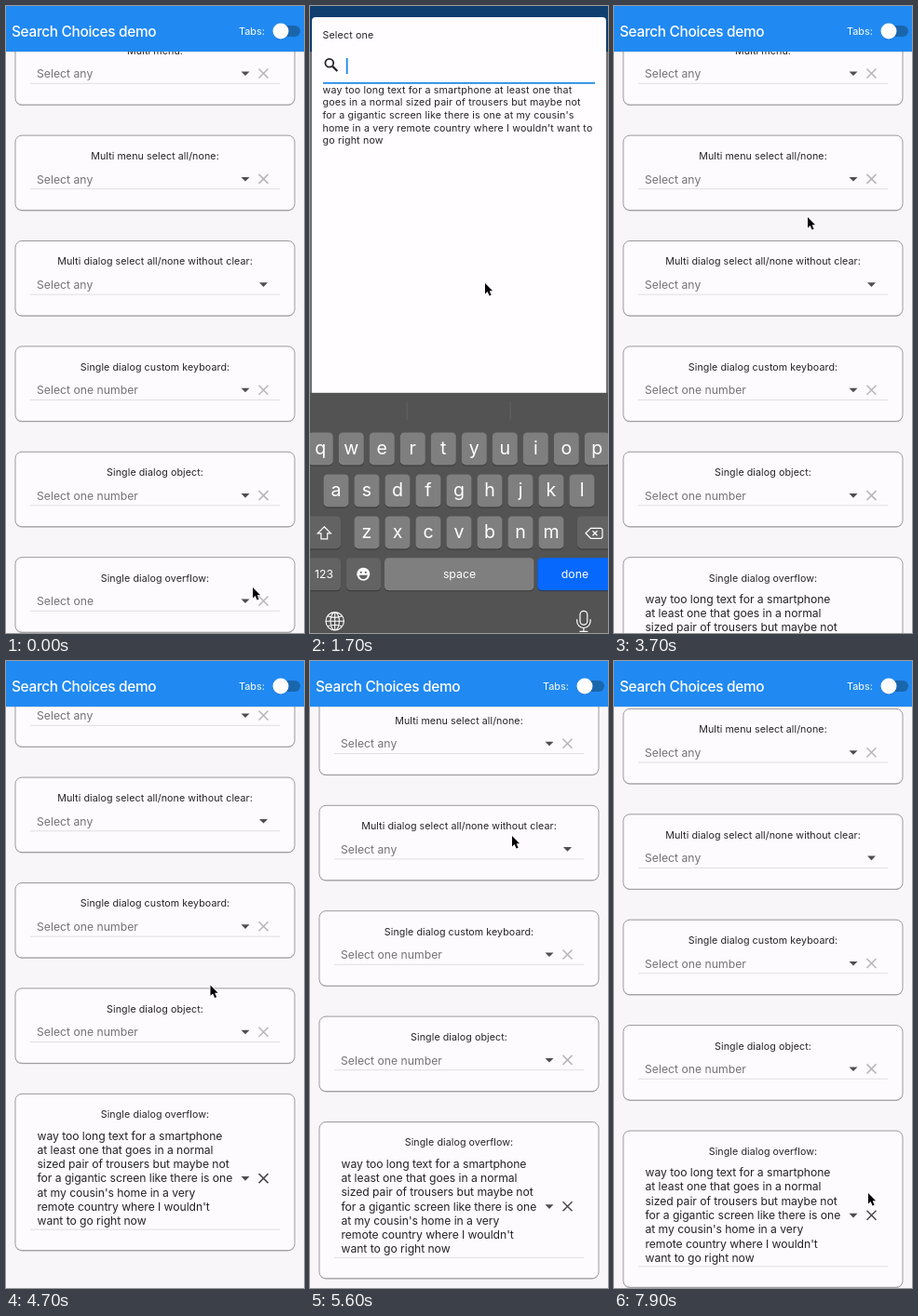
Write an HTML page with a canvas that moves like this. It is 320 by 674 pixels and loops after 8000 ms.

```html
<!DOCTYPE html>
<html lang="en">
<head>
<meta charset="utf-8">
<title>Search Choices demo</title>
<style>
  html, body { margin: 0; width: 100%; height: 100%; overflow: hidden; background: #f8f6f9; }
  canvas { display: block; width: 320px; height: 674px; }
</style>
</head>
<body>
<canvas id="stage"></canvas>
<script>
const W = 320, H = 674, LOOP = 8000;
const canvas = document.getElementById('stage');
const ctx = canvas.getContext('2d');
const ratio = window.devicePixelRatio || 1;
canvas.width = W * ratio;
canvas.height = H * ratio;

const BLUE = '#2089f2', BODY = '#f8f6f9', INK = '#242326', HINT = '#747276';
const MAX_SCROLL = 87.7;
const LONG_LINES = ['way too long text for a smartphone', 'at least one that goes in a normal',
  'sized pair of trousers but maybe not', 'for a gigantic screen like there is one',
  "at my cousin's home in a very", "remote country where I wouldn't", 'want to go right now'];
const DIALOG_LINES = ['way too long text for a smartphone at least one that',
  'goes in a normal sized pair of trousers but maybe not',
  "for a gigantic screen like there is one at my cousin's",
  "home in a very remote country where I wouldn't want to", 'go right now'];
const CARDS = [
  { title: 'Multi menu:', hint: 'Select any', clear: true },
  { title: 'Multi menu select all/none:', hint: 'Select any', clear: true },
  { title: 'Multi dialog select all/none without clear:', hint: 'Select any' },
  { title: 'Single dialog custom keyboard:', hint: 'Select one number', clear: true },
  { title: 'Single dialog object:', hint: 'Select one number', clear: true },
  { title: 'Single dialog overflow:', hint: 'Select one', clear: true, overflow: true }
];
// Pointer stops: time, x, y
const POINTER = [[0, 265, 625], [100, 265, 625], [400, 244, 636], [1000, 244, 636],
  [1650, 188, 298], [1900, 188, 298], [2500, 162, 127], [3150, 162, 127], [3600, 203, 212],
  [3700, 208, 227], [4150, 222, 510], [4250, 222, 510], [5150, 217, 188], [6050, 217, 188],
  [6300, 229, 213], [6700, 234, 244], [6950, 234, 244], [7780, 271, 562], [7900, 273, 572], [8000, 273, 572]];

const clamp = v => Math.max(0, Math.min(1, v));
const span = (t, a, b) => clamp((t - a) / (b - a));
const mix = (a, b, p) => a + (b - a) * p;
const smooth = p => p * p * (3 - 2 * p);
const easeOut = p => 1 - (1 - p) ** 3;
const gray = v => `rgb(${v},${v},${v})`;

function pointerAt(t) {
  const i = Math.max(1, POINTER.findIndex(k => k[0] >= t));
  const a = POINTER[i - 1], b = POINTER[i];
  const p = smooth(span(t, a[0], b[0]));
  return [mix(a[1], b[1], p), mix(a[2], b[2], p)];
}

function scrollAt(t) {
  if (t < 4250) return 0;
  const drag = 510 - pointerAt(Math.min(t, 5150))[1];
  const extra = Math.max(0, drag - MAX_SCROLL);
  let over = 0.593 * extra / (1 + extra * 0.0014);
  const s = Math.max(0, t - 5200) / 100;
  over *= (1 + s) * Math.exp(-s);
  return Math.min(drag, MAX_SCROLL) + over;
}

// Share of the keyboard that is on screen
function keyboardAt(t) {
  return t < 3120 ? easeOut(span(t, 1200, 1880)) : 1 - smooth(span(t, 3120, 3500));
}

// y is the middle of the capital letters
function text(str, x, y, size, spacing, color, align = 'left', weight = 400) {
  ctx.font = `${weight} ${size}px Inter, sans-serif`;
  ctx.letterSpacing = spacing + 'px';
  ctx.textAlign = align;
  ctx.fillStyle = color;
  ctx.fillText(str, x, y + size * 0.36);
}

function box(x, y, w, h, r, fill) {
  ctx.beginPath();
  ctx.roundRect(x, y, w, h, r);
  ctx.fillStyle = fill;
  ctx.fill();
}

function disc(x, y, r, fill) {
  ctx.beginPath();
  ctx.arc(x, y, r, 0, 7);
  ctx.fillStyle = fill;
  ctx.fill();
}

function stroke(path, color, width) {
  ctx.strokeStyle = color;
  ctx.lineWidth = width;
  ctx.stroke(new Path2D(path));
}

function shape(path, color) {
  ctx.fillStyle = color;
  ctx.fill(new Path2D(path));
}

function drawCard(card, top, filled) {
  const full = card.overflow && filled;
  const height = full ? 168.3 : 80.5;
  const mid = top + (full ? 91 : 47);
  const arrowX = card.clear ? 257 : 276.5;
  box(10, top + 1, 300, height, 7, '#c2c0c3');
  box(10, top, 300, height, 7, '#fdfbfe');
  ctx.strokeStyle = '#9b999c';
  ctx.lineWidth = 1;
  ctx.beginPath();
  ctx.roundRect(10, top + 0.2, 300, height, 7);
  ctx.stroke();
  text(card.title, 160, top + 22.3, 10.7, 0.07, INK, 'center');
  if (full) LONG_LINES.forEach((line, i) => text(line, 33.5, top + 45 + i * 15.3, 12.2, -0.06, INK));
  else text(card.hint, 33, top + 47.3, 12.2, 0.02, HINT);
  ctx.fillStyle = '#e0dee1';
  ctx.fillRect(26, top + (full ? 145.5 : 57.3), 268, 1);
  shape(`M${arrowX - 4.5} ${mid - 2}h9l-4.5 4.6z`, '#4f4d51');
  if (card.clear) {
    stroke(`M271.5 ${mid - 5}l10 10m0 -10l-10 10`, full ? '#4a484b' : '#b7b5b8', 1.5);
  }
}

function drawPage(scroll, filled) {
  ctx.fillStyle = BODY;
  ctx.fillRect(0, 0, W, H);
  CARDS.forEach((card, i) => {
    const top = 25.5 + i * 113.4 - scroll;
    if (top > -120) drawCard(card, top, filled);
  });
  ctx.fillStyle = 'rgba(0,0,0,.08)';
  ctx.fillRect(0, 49, W, 1);
  ctx.fillStyle = BLUE;
  ctx.fillRect(0, 0, W, 49);
  text('Search Choices demo', 6, 27, 15.4, -0.32, '#fff', 'left', 500);
  text('Tabs:', 250, 27, 10.8, 0.05, '#fff');
  box(289, 21, 27, 12, 6, '#1a66ad');
  disc(295, 27.4, 8.6, 'rgba(0,0,0,.15)');
  disc(295, 27, 8.5, '#fff');
}

function drawDialog(t, shown) {
  const closing = t > 2700;
  const lift = closing ? 1 : keyboardAt(t - 250);
  const bottom = mix(665, 403.5, lift);
  ctx.fillStyle = `rgba(0,0,0,${0.54 * shown ** 0.45})`;
  ctx.fillRect(0, 0, W, H);
  ctx.globalAlpha = shown ** 0.75;
  box(2, 12, 316, bottom - 12, 4, '#fffdff');
  text('Select one', 13.5, 31, 10.7, 0.14, INK);
  ctx.beginPath();
  ctx.arc(20.8, 61.3, 4.4, 0, 7);
  ctx.strokeStyle = INK;
  ctx.lineWidth = 1.8;
  ctx.stroke();
  stroke('M24 64.6L29.4 70', INK, 2.2);
  if (closing) {
    ctx.fillStyle = '#666';
    ctx.fillRect(14, 82, 292, 1);
    box(87, 137, 153, 14, 5, 'rgba(0,0,0,.06)');
  } else {
    ctx.fillStyle = '#1a86e8';
    ctx.fillRect(14, 82, 292, 1.7);
    if (t > 1200 && Math.floor((t - 1000) / 500) % 2) ctx.fillRect(38.8, 56, 1.8, 17);
  }
  DIALOG_LINES.forEach((line, i) => text(line, 13.5, 90 + i * 13.6, 10.7, 0.15, INK));
  text('Close', 270.5, bottom - 31.5, 11.6, 0.3, INK, 'center', 500);
  ctx.globalAlpha = 1;
}

function drawKeyboard(t, share) {
  const dark = span(t, 1700, 1950);
  const back = gray(mix(83, 58, dark)), light = gray(mix(127, 108, dark));
  const special = gray(mix(99, 70, dark));
  const key = (x, y, w, fill) => {
    box(x, y + 1, w, 35, 4.5, 'rgba(0,0,0,.35)');
    box(x, y, w, 35, 4.5, fill);
  };
  ctx.save();
  ctx.translate(0, mix(H, 411, share));
  ctx.fillStyle = back;
  ctx.fillRect(0, 0, W, 264);
  ctx.fillStyle = special;
  ctx.fillRect(103.7, 9, 1, 20);
  ctx.fillRect(214.7, 9, 1, 20);
  ['qwertyuiop', 'asdfghjkl', 'zxcvbnm'].forEach((row, r) => {
    [...row].forEach((letter, i) => {
      const x = [11.3, 28, 61][r] + i * 33, y = 42.6 + r * 45;
      key(x - 13.5, y, 27, light);
      text(letter, x, y + 16.7, 19.6, 0, '#fff', 'center');
    });
  });
  key(-6, 132.6, 39, special);
  key(287, 132.6, 40, special);
  key(-6, 177.5, 39, special);
  key(39, 177.5, 37, special);
  key(80, 177.5, 160.5, light);
  key(244.3, 177.5, 82, '#0668fc');
  stroke('M15.3 144l7 7h-3.6v6h-6.8v-6H8.3z', '#fff', 1.2);
  stroke('M301.5 145.5H312q2 0 2 2v7q0 2 -2 2H301.5L296 151zM303.5 148.5l5 5m0-5l-5 5', '#fff', 1.2);
  text('123', 15, 195, 12.2, 0.1, '#fff', 'center');
  text('space', 160.5, 195, 12.3, 0, '#fff', 'center');
  text('done', 284.5, 195, 12.3, 0, '#fff', 'center');
  disc(57.3, 195, 7, '#fff');
  disc(54.8, 193, 1.1, special);
  disc(59.8, 193, 1.1, special);
  shape('M52.8 196h9a4.5 4.2 0 0 1 -9 0z', special);
  stroke('M17 245.5a9.7 9.7 0 1 0 19.4 0a9.7 9.7 0 1 0 -19.4 0M22 245.5a4.7 9.7 0 1 0 9.4 0a4.7 9.7 0 1 0 -9.4 0' +
    'M26.7 235.8v19.4M17 245.5h19.4M19 240q7.7 3 15.4 0M19 251q7.7 -3 15.4 0', '#fff', 1.1);
  stroke('M290 238.5a3.9 3.9 0 0 1 7.8 0v7a3.9 3.9 0 0 1 -7.8 0zM286.7 243.5v2a7.2 7.2 0 0 0 14.4 0v-2M293.9 252.7v3.5M289.5 256.5h8.8', '#fff', 1.2);
  ctx.restore();
}

function drawPointer(x, y) {
  const arrow = new Path2D('M0 0V11.4L2.6 9L4.6 13.6L6.6 12.7L4.7 8.2H8.1Z');
  ctx.save();
  ctx.translate(x, y);
  ctx.lineJoin = 'round';
  ctx.strokeStyle = '#fff';
  ctx.lineWidth = 1.6;
  ctx.stroke(arrow);
  ctx.fillStyle = '#000';
  ctx.fill(arrow);
  ctx.restore();
}

function frame(now) {
  const t = now % LOOP;
  ctx.setTransform(ratio, 0, 0, ratio, 0, 0);
  drawPage(scrollAt(t), t > 2750);
  const shown = t < 2000 ? span(t, 950, 1250) : 1 - span(t, 2850, 3250);
  if (shown > 0) drawDialog(t, shown);
  const share = keyboardAt(t);
  if (share > 0) drawKeyboard(t, share);
  drawPointer(...pointerAt(t));
  requestAnimationFrame(frame);
}
requestAnimationFrame(frame);
</script>
</body>
</html>
```
